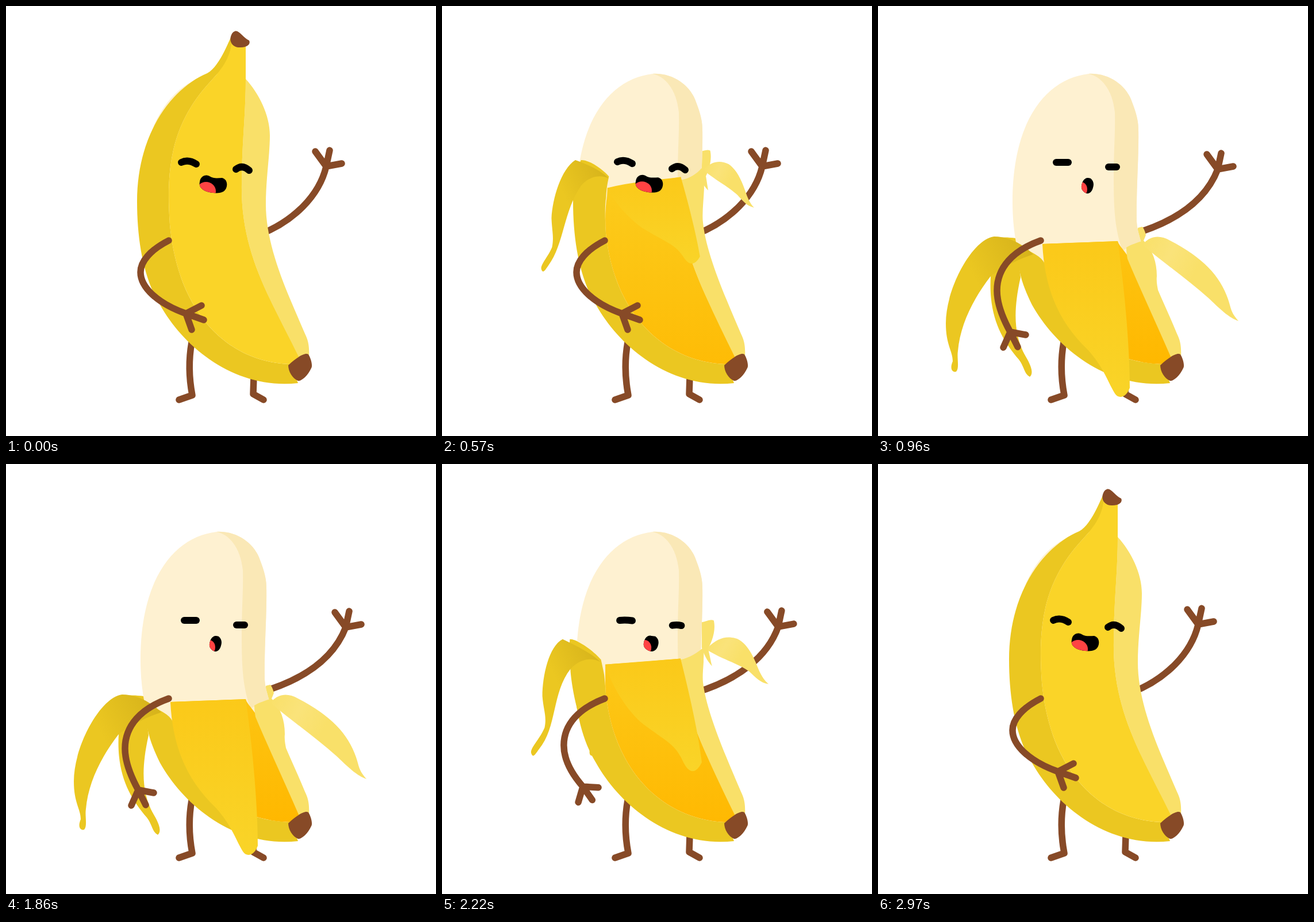
These frames come from a looping animation (748x748 px, 3000 ms). An HTML page:

```html
<!DOCTYPE html>
<html lang="en">
<head>
<meta charset="utf-8">
<title>Peeling banana</title>
<style>
  html, body { margin: 0; width: 100%; height: 100%; overflow: hidden; background: #fff; }
  svg { display: block; width: 100%; height: 100%; }
  .limb { fill: none; stroke: #874a27; stroke-width: 11.5; stroke-linecap: round; stroke-linejoin: round; }
  .eye { fill: none; stroke: #000; stroke-width: 12; stroke-linecap: round; }
  .dark { fill: #ebc721; }
  .light { fill: #f9e069; }
  .brown { fill: #874a27; }
</style>
</head>
<body>
<svg viewBox="0 0 748 748">
  <defs>
    <linearGradient id="insideFill" gradientUnits="userSpaceOnUse" x1="0" y1="150" x2="0" y2="620">
      <stop stop-color="#fad428"/><stop id="insideEnd" offset="1"/>
    </linearGradient>
    <linearGradient id="frontFill" x1="0" y1="0" x2="0" y2="1">
      <stop stop-color="#fbc919"/><stop offset="1" stop-color="#f9d428"/>
    </linearGradient>
    <linearGradient id="leftFill" x1=".9" y1="0" x2=".4" y2=".4">
      <stop stop-color="#d6b31b"/><stop offset="1" stop-color="#ebc721"/>
    </linearGradient>
    <linearGradient id="rightFill" x1="0" y1="0" x2=".6" y2=".3">
      <stop stop-color="#f9e069"/><stop offset=".5" stop-color="#fae37a"/><stop offset="1" stop-color="#f9e069"/>
    </linearGradient>
    <clipPath id="mouthClip"><path class="gesture"
      data-shut="M337 306C338 296 347 292 354 296C362 301 369 299 376 299C384 301 386 310 383 317C379 326 368 326 360 325C348 324 334 318 337 306Z"
      data-open="M354 313C355 306 358 300 364 299C366 299 368 299 370 300C375 304 376 310 374 316C372 324 367 327 363 326C357 324 353 319 354 313Z"/></clipPath>
  </defs>

  <path class="limb" d="M323 585Q315 630 324 677L301 685M431 645L430 675L448 685"/>
  <path class="limb gesture"
    data-shut="M440 398C500 375 545 330 557 279L538 253M557 279L563 251M557 279L584 274"
    data-open="M440 398C520 375 571 336 591 284L572 258M591 284L597 256M591 284L618 279"/>

  <!-- Behind the flesh: stalk and rear strips -->
  <path class="peel" fill="#fad428"
    data-shut="M355 125C375 108 385 80 391 62C400 62 417 62 417 68L417 130Z"
    data-loose="M372 119C388 104 405 94 425 91C422 100 419 112 419 118L418 132Z"
    data-half="M372 260C380 260 390 260 400 260C400 265 400 270 400 275L400 290Z"/>
  <path class="peel dark"
    data-shut="M310 160C305 155 300 155 296 160C280 180 260 210 255 230C250 260 248 280 246 300C246 305 247 308 248 310C250 312 252 308 253 300C260 260 270 220 300 180Z"
    data-half="M262 332C250 320 235 306 222 306C220 320 222 340 223 358C226 400 240 455 258 490C258 497 255 503 258 508C262 512 268 505 268 495C262 460 250 400 246 380Z"
    data-low="M250 378C240 375 225 365 215 365C205 390 202 410 202 424C188 490 215 550 243 588C255 602 256 620 260 627C268 632 268 612 264 600C240 545 236 510 246 465Z"
    data-open="M240 404C225 402 215 402 205 404C196 430 196 450 196 470C192 540 215 580 245 615C255 628 254 640 264 645C270 640 268 630 260 615C235 575 235 530 248 472Z"/>
  <path class="peel light"
    data-shut="M430 180C434 178 440 178 445 180C447 190 447 200 446 210C444 214 442 214 440 214C436 214 433 214 430 212Z"
    data-half="M452 276C460 275 467 270 473 273C477 290 470 310 463 322C466 335 468 345 470 353C460 342 455 330 452 320Z"
    data-low="M450 338C455 337 460 334 465 337C474 345 478 355 484 364C478 370 472 376 466 380C460 382 455 380 450 380Z"
    data-open="M452 386C455 385 458 384 460 384C463 388 465 394 466 398C464 404 462 408 460 412C457 414 454 414 452 412Z"/>

  <!-- Flesh -->
  <path fill="#fef1d1" d="M366 118C402 116 430 138 440 162C446 178 453 195 453 215C454 260 449 320 450 375C451 390 455 400 458 412L430 440L300 470C290 440 270 430 241 416C236 390 234 365 234 340C234 200 292 127 366 118Z"/>
  <path fill="#fae8b6" d="M366 118C402 116 430 138 440 162C446 178 453 195 453 215C454 260 449 320 450 375C451 390 455 400 458 412L425 425C413 390 410 360 410 300C410 250 413 220 412 185C408 145 388 122 366 118Z"/>

  <!-- Peel: left side, inside, right side, flaps -->
  <path class="peel dark"
    data-shut="M396 46C390 52 374 104 350 117C290 142 228 220 228 340C228 410 240 475 268 520C310 595 400 668 508 656L495 623C390 620 300 540 285 380C278 280 288 205 355 132C370 116 388 96 392 68Z"
    data-loose="M338 146C330 137 322 135 308 142C265 180 228 250 228 340C228 410 240 475 268 520C310 595 400 668 508 656L495 623C390 620 300 540 285 380C281 310 284 250 297 215C305 185 322 165 338 146Z"
    data-half="M276 342C268 332 240 308 222 306C222 318 226 330 228 340C228 410 240 475 268 520C310 595 400 668 508 656L495 623C390 620 300 540 285 400C284 385 283 375 282 368C280 358 278 350 276 342Z"
    data-low="M275 392C268 382 245 385 232 396C232 405 233 415 235 430C240 465 250 495 268 520C310 595 400 668 508 656L495 623C390 620 325 545 298 450C294 435 290 425 286 415C282 406 279 399 275 392Z"
    data-open="M290 448C282 432 262 428 246 416C240 420 242 440 246 460C250 480 258 500 268 520C310 595 400 668 508 656L495 623C390 620 310 550 300 490C298 480 296 470 294 462C293 456 291 452 290 448Z"/>
  <path class="peel" fill="url(#insideFill)"
    data-shut="M392 68C388 96 370 116 355 132C288 205 278 280 285 380C300 540 390 620 495 623L512 612C460 510 408 430 410 310C410 240 417 190 417 128C417 108 417 88 417 68C410 60 400 60 392 68Z"
    data-loose="M300 205C299 209 298 212 297 215C284 250 281 310 285 380C300 540 390 620 495 623L512 612C460 510 408 430 410 310C410 250 416 210 417 172C417 168 417 165 417 156C380 166 315 172 300 205Z"
    data-half="M284 350C284 356 284 362 284 366C284 380 284 390 285 400C300 540 390 620 495 623L512 612C460 510 424 430 419 380C418 365 416 350 415 345C415 343 415 341 415 340C370 344 330 347 284 350Z"
    data-low="M285 386C286 392 287 400 288 408C289 415 290 420 294 432C312 545 390 620 495 623L512 612C470 520 435 450 424 415C420 400 416 390 414 384C414 382 414 380 414 378C370 381 330 383 285 386Z"
    data-open="M286 414C288 420 289 430 290 440C292 455 296 470 300 485C312 550 390 620 495 623L512 612C490 545 456 475 436 437C428 425 421 418 418 412C418 411 417 410 417 409C370 411 330 412 286 414Z"/>
  <path class="peel light"
    data-shut="M417 128C417 128 417 127 417 127C440 152 459 190 459 225C459 260 452 300 452 345C452 420 490 500 520 570C526 582 528 592 527 612L510 612C460 510 408 430 410 310C410 240 417 190 417 128Z"
    data-loose="M418 172C430 176 438 166 440 156C452 175 459 200 459 225C459 260 452 300 452 345C452 420 490 500 520 570C526 582 528 592 527 612L510 612C460 510 408 430 410 310C410 250 416 210 418 172Z"
    data-half="M415 342C430 338 445 330 455 320C456 330 455 335 455 345C454 360 453 370 454 380C460 430 490 500 520 570C526 582 528 592 527 612L510 612C460 510 424 430 419 380C418 370 416 358 415 342Z"
    data-low="M424 395C432 385 445 378 462 372C475 378 484 388 485 400C486 420 478 440 473 452C480 480 500 525 520 570C526 582 528 592 527 612L510 612C480 550 440 475 430 430C426 415 424 405 424 395Z"
    data-open="M432 420C440 415 450 412 462 408C478 425 485 445 485 470C484 480 486 488 487 494C498 520 510 545 520 570C526 582 528 592 527 612L510 612C484 552 455 490 434 440C433 434 432 428 432 420Z"/>
  <path class="peel flap" fill="url(#rightFill)"
    data-shut="M436 158C440 158 444 165 447 175C450 190 455 210 456 225C456 232 456 236 456 240C450 236 448 230 445 220C440 200 437 180 436 158Z"
    data-half="M463 320C480 304 495 299 514 305C535 315 545 342 553 362C558 372 562 378 569 384C555 382 548 374 535 362C515 348 490 342 463 326Z"
    data-low="M463 376C478 360 495 354 512 362C560 382 578 420 588 456C591 464 596 470 602 474C585 469 570 455 545 434C520 414 490 400 463 384Z"
    data-open="M463 412C475 400 490 398 508 408C570 440 600 475 612 520C615 533 620 540 627 548C611 542 600 532 576 509C540 477 504 452 463 418Z"/>
  <path class="peel" fill="url(#frontFill)"
    data-shut="M392 68C392 68 400 66 405 66C408 66 410 66 412 66C414 66 416 67 417 68C417 68 417 68 417 68Z"
    data-loose="M300 205C310 180 345 172 360 168C380 162 400 160 420 156C428 152 434 150 438 150C430 153 424 155 417 156Z"
    data-half="M284 350C295 390 325 435 350 455C390 485 405 490 418 518C428 540 440 546 452 522C446 470 430 400 415 340Z"
    data-low="M285 386C295 450 310 500 345 540C385 575 400 590 412 606C420 618 436 622 446 602C440 540 430 460 414 378Z"
    data-open="M286 414C290 500 320 555 365 598C392 628 398 650 412 674C418 684 432 682 438 664C438 600 430 500 417 409Z"/>
  <path class="peel flap" fill="url(#leftFill)"
    data-shut="M338 146C330 137 318 136 308 142C280 170 252 220 245 250C242 265 238 275 236 285C234 292 232 298 234 304C238 306 240 300 242 296C255 260 280 215 306 160C312 150 322 146 338 146Z"
    data-half="M275 346C262 332 230 316 209 306C185 318 174 370 174 405C176 430 182 440 178 460C170 480 150 498 155 506C158 514 162 506 168 498C200 460 190 400 223 358C235 345 255 335 275 346Z"
    data-low="M275 395C255 378 225 362 203 357C170 358 142 440 142 490C142 515 152 530 150 545C146 556 136 568 146 573C158 566 158 555 159 540C162 500 175 460 202 424C220 410 255 395 275 395Z"
    data-open="M270 432C250 412 225 401 202 401C165 405 118 490 118 552C118 590 130 600 130 618C124 632 130 638 136 636C142 630 137 612 139 600C143 555 165 510 196 470C215 455 245 440 270 432Z"/>

  <path class="brown" d="M491 625C505 612 520 602 526 606C530 612 534 625 531 630C525 643 514 653 508 652C498 648 491 635 491 625Z"/>
  <path id="tip" class="brown" d="M398 44C405 41 412 55 423 60C426 66 420 72 408 72C396 73 388 64 391 53C393 47 395 45 398 44Z"/>

  <g id="face">
    <path class="eye gesture" data-shut="M305 272Q317 266 331 275" data-open="M310 272Q320 272 331 272"/>
    <path class="eye gesture" data-shut="M400 284Q411 275 423 286" data-open="M401 280Q408 280 415 280"/>
    <g clip-path="url(#mouthClip)">
      <rect x="330" y="285" width="60" height="50"/>
      <ellipse id="tongue" fill="#ff4343"/>
    </g>
  </g>
  <path class="limb gesture"
    data-shut="M283 408C250 425 234 445 234 463C234 490 265 518 313 535L340 521M313 535L344 546M313 535L323 563"
    data-open="M283 408C235 425 207 455 207 495C207 520 218 545 230 567L257 572M230 567L243 593M230 567L218 594"/>
</svg>
<script>
const LOOP = 3000, MIRROR = 2820;
const POSES = ['shut', 'loose', 'half', 'low', 'open'];
const POSE_TIMES = [30, 420, 600, 690, 960];
const EASES = [u => u ** 3, u => u ** 1.5, u => u, u => u * (2 - u)];

const byId = id => document.getElementById(id);
const clamp = u => Math.min(1, Math.max(0, u));
const progress = (t, from, to) => clamp((t - from) / (to - from));
const smooth = u => u * u * (3 - 2 * u);
const lerp = (a, b, u) => a + (b - a) * u;

function mixPaths(a, b, u) {
  const ends = b.match(/\d+/g);
  let i = 0;
  return a.replace(/\d+/g, n => lerp(+n, +ends[i++], u).toFixed(2) + ' ');
}

// A missing pose keeps the shape of the one before it.
const peels = [...document.querySelectorAll('.peel')].map(el => {
  let last;
  return { el, paths: POSES.map(pose => last = el.dataset[pose] ?? last) };
});
const gestures = document.querySelectorAll('.gesture');
const flaps = document.querySelectorAll('.flap');

function drawPeel(t) {
  const time = t < MIRROR / 2 ? t : MIRROR - t;
  let step = 0;
  while (step < 3 && time >= POSE_TIMES[step + 1]) step++;
  const u = EASES[step](progress(time, POSE_TIMES[step], POSE_TIMES[step + 1]));
  for (const { el, paths } of peels) el.setAttribute('d', mixPaths(paths[step], paths[step + 1], u));

  const loosened = step ? 1 : u;
  for (const flap of flaps) flap.setAttribute('opacity', loosened);
  const ripeness = step ? clamp(.55 + (step - 1 + u) * .4) : u * .55;
  byId('insideEnd').setAttribute('stop-color',
    `rgb(${lerp(250, 255, ripeness)},${lerp(212, 184, ripeness)},${lerp(40, 0, ripeness)})`);
  byId('tip').setAttribute('transform', `translate(0 ${18 * loosened})`);
  byId('tip').setAttribute('visibility', time < 435 ? 'visible' : 'hidden');
}

function drawGesture(t) {
  const q = smooth(progress(t, 690, 960)) - smooth(progress(t, 2128, 2470));
  for (const el of gestures) el.setAttribute('d', mixPaths(el.dataset.shut, el.dataset.open, q));
  const tongue = { cx: lerp(348, 353, q), cy: lerp(322, 319, q), rx: lerp(17, 11, q), ry: lerp(16, 13, q) };
  for (const key in tongue) byId('tongue').setAttribute(key, tongue[key]);

  const bob = t < 1500 ? progress(t, 30, 660) : progress(t, 2470, 2990);
  byId('face').setAttribute('transform', `translate(0 ${-4.5 * Math.sin(Math.PI * bob) ** 2})`);
}

const start = performance.now();
function frame() {
  const t = (performance.now() - start) % LOOP;
  drawPeel(t);
  drawGesture(t);
  requestAnimationFrame(frame);
}
frame();
</script>
</body>
</html>
```
